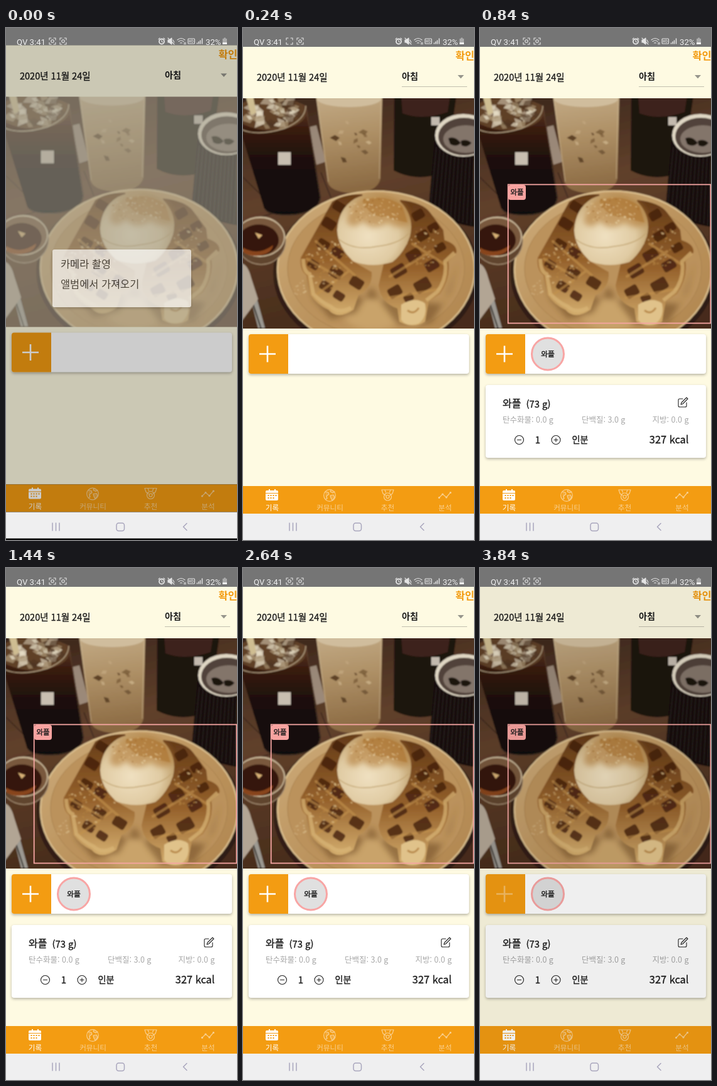
Write an HTML page that moves like this. It is 368 px wide and 816 px high and loops after 3.96 s.

```html
<!DOCTYPE html>
<html lang="ko">
<head>
<meta charset="utf-8">
<title>식단 기록</title>
<style>
html, body { margin: 0; width: 100%; height: 100%; overflow: hidden; background: #000; }
svg { display: block; width: 368px; height: 816px; }
text { font-family: 'Noto Sans CJK KR', 'Noto Sans', sans-serif; fill: #1c1c1c; }
.b { font-weight: 700; }
.m { stroke: #1c1c1c; stroke-width: .35px; }
.sys { font: 13.2px Roboto, sans-serif; fill: #eee; }
.line { fill: none; stroke: currentColor; stroke-linecap: round; stroke-linejoin: round; }
.info text { font-size: 12.5px; font-weight: 300; fill: #a6a6a6; }
.tabs text { font-size: 11.6px; text-anchor: middle; fill: #f9cf8e; }
.tabs { color: #f9cf8e; }
.card { filter: drop-shadow(0 2px 2px rgba(0,0,0,.28)); }
</style>
</head>
<body>
<svg viewBox="0 0 368 816">
  <defs>
    <linearGradient id="table" x1="0" y1="0" x2=".25" y2="1">
      <stop offset="0" stop-color="#38241a"/><stop offset=".45" stop-color="#60402b"/><stop offset="1" stop-color="#472c1b"/>
    </linearGradient>
    <linearGradient id="coffee" x1="0" y1="0" x2="0" y2="1">
      <stop offset="0" stop-color="#6d4a30"/><stop offset=".26" stop-color="#3a1c10"/><stop offset=".55" stop-color="#1b0f0b"/><stop offset="1" stop-color="#110b09"/>
    </linearGradient>
    <linearGradient id="latte" x1="0" y1="0" x2=".1" y2="1">
      <stop offset="0" stop-color="#c3ab86"/><stop offset=".45" stop-color="#ae9066"/><stop offset="1" stop-color="#8b6a43"/>
    </linearGradient>
    <linearGradient id="plate" x1="0" y1="0" x2="1" y2="1">
      <stop offset="0" stop-color="#cdac7b"/><stop offset=".5" stop-color="#bb935d"/><stop offset="1" stop-color="#b0854e"/>
    </linearGradient>
    <radialGradient id="cream" cx=".42" cy=".6" r=".62">
      <stop offset="0" stop-color="#efe0c0"/><stop offset=".65" stop-color="#e0cba3"/><stop offset="1" stop-color="#bd9c68"/>
    </radialGradient>
    <linearGradient id="waffle" x1="0" y1="0" x2="0" y2="1">
      <stop offset="0" stop-color="#643a18"/><stop offset=".55" stop-color="#96622c"/><stop offset="1" stop-color="#d3ad6e"/>
    </linearGradient>
    <clipPath id="frame"><rect y="112" width="368" height="367"/></clipPath>
    <clipPath id="sheet"><rect y="30" width="368" height="744"/></clipPath>
    <filter id="soft" x="-5%" y="-5%" width="110%" height="110%"><feGaussianBlur stdDeviation=".8"/></filter>
    <filter id="haze" x="-30%" y="-30%" width="160%" height="160%"><feGaussianBlur stdDeviation="5"/></filter>
  </defs>

  <g id="page">
    <rect y="-4" width="368" height="34" fill="#757575"/>
    <rect y="30" width="368" height="700" fill="#fefae2"/>
    <g clip-path="url(#sheet)">
      <text class="b" x="338.5" y="50" font-size="16.4" style="fill:#f39c12">확인</text>
      <text class="m" x="22" y="84.3" font-size="14.5">2020년 11월 24일</text>
      <text class="b" x="253" y="82.3" font-size="14.2">아침</text>
      <path d="M342 75h10l-5 5.5z" fill="#96958c"/>
      <path id="rule" d="M253 93.5h104" stroke="#c2bfae"/>

      <g id="photo" clip-path="url(#frame)"><g filter="url(#soft)">
        <rect x="-4" y="108" width="376" height="375" fill="url(#table)"/>
        <path d="M0 238L60 296M124 230L140 270M0 310L110 276" stroke="#33211a" stroke-width="2" opacity=".6"/>
        <path d="M105 158l12-3 15 58-15 5z" fill="#b3a595" opacity=".75"/>

        <path d="M241 108H340L334 150 300 236Q268 242 240 227Z" fill="#1f130e"/>
        <path d="M252 108h78l-4 26q-40 14-72 2z" fill="#3d241a"/>
        <rect x="300" y="142" width="13" height="13" fill="#c2b9ad"/>

        <path d="M116 108H222L219 240Q214 262 176 263 140 262 135 246Z" fill="url(#latte)"/>
        <ellipse cx="169" cy="113" rx="51" ry="13" fill="#d0bd9d"/>
        <g id="cubes"/>
        <path d="M118 112L136 245M220 112L217 240" stroke="#d4c1a0" fill="none" opacity=".6"/>

        <path d="M-8 128Q45 96 101 124L124 270Q122 292 84 298 40 301 34 288L-8 150Z" fill="url(#coffee)"/>
        <ellipse cx="44" cy="136" rx="56" ry="27" fill="#5f4028"/>
        <g id="ice"/>
        <path d="M4 108l9 31 8-4-5-27z" fill="#cfbd92"/>
        <path d="M-6 160Q20 174 66 160 100 146 100 124" fill="none" stroke="#b5a284" stroke-width="1.4"/>
        <path d="M101 130L123 270Q121 291 84 297 44 301 34 288" fill="none" stroke="#6b523f" opacity=".7"/>
        <rect x="56" y="198" width="20" height="20" fill="#c8beb0"/>

        <path d="M306 168L295 294Q325 310 368 317V150Z" fill="#17110f"/>
        <g id="ribs" stroke="#2a201a" stroke-width="1.5"/>
        <ellipse cx="351" cy="171" rx="45" ry="34" fill="#e0d7c4"/>
        <ellipse cx="352" cy="173" rx="41" ry="30" fill="#51433a"/>
        <ellipse cx="355" cy="177" rx="36" ry="22" fill="#83756a"/>
        <path d="M327 176q10-5 20 7 -7 8-17 2zM347 180q9-4 17 3 -7 9-16 4z" fill="#1d1511"/>

        <ellipse cx="212" cy="390" rx="164" ry="129" fill="#20130c" opacity=".6"/>
        <ellipse cx="212" cy="385" rx="157" ry="125" fill="url(#plate)" stroke="#dcc090" stroke-width="2.5"/>
        <ellipse cx="212" cy="383" rx="141" ry="108" fill="#bb925c" stroke="#a8814e"/>
        <ellipse cx="208" cy="455" rx="48" ry="26" fill="#c9a36b" filter="url(#haze)"/>
        <path d="M104 400L112 432 140 464 180 454 205 412 222 440 246 472 300 470 330 420 343 372 320 440 190 430z" fill="#6d4824" opacity=".55" filter="url(#haze)"/>

        <path d="M190 265Q160 264 142 277L119 318 92 366Q90 386 101 394L107 425Q118 441 136 449 151 466 176 449L184 426Q207 414 205 389L172 370 196 300Z" fill="url(#waffle)"/>
        <path d="M250 274Q286 278 298 294L319 322 321 338Q342 345 340 358L327 372Q331 398 314 424L296 436 290 468Q272 480 249 468L246 447Q219 438 216 410L224 376 262 344Z" fill="url(#waffle)"/>
        <g id="pockets" fill="#431f0c"/>
        <path d="M102 368l52 30M116 340l62 54M118 424l50-36M234 396l64-40M270 344l50 32M232 430l82-14" fill="none" stroke="#c4934f" stroke-width="4" stroke-linecap="round" opacity=".6"/>
        <path d="M96 368Q96 388 106 392L112 424Q126 438 140 444 152 456 172 446M337 358L322 372Q326 398 310 420L292 434" fill="none" stroke="#d9b677" stroke-width="6" opacity=".7"/>
        <path d="M252 441q22-14 38-2 4 21-10 32 -20 6-28-6z" fill="#e0c28a"/>
        <path d="M262 450q10 8 18-4" fill="none" stroke="#b98a4b" stroke-width="3"/>

        <path d="M150 322Q152 288 178 272 212 255 249 275 274 300 266 332 257 358 238 373 205 383 176 372 151 350 150 322Z" fill="url(#cream)"/>
        <path d="M165 309Q168 280 194 268 229 258 255 280 268 297 265 313 245 323 231 310 205 326 191 307 176 324 165 309Z" fill="#b17a38" opacity=".6" filter="url(#haze)"/>
        <path d="M190 276Q226 262 254 284L262 310Q240 306 226 300 204 304 190 276Z" fill="#ab7331" opacity=".55"/>
        <path d="M152 336Q176 356 214 348 250 344 264 327" fill="none" stroke="#c4a775" stroke-width="1.6"/>
        <g id="sugar"/>

        <ellipse cx="29" cy="339" rx="39" ry="38" fill="#61442f" stroke="#a18b70" stroke-width="1.4"/>
        <ellipse cx="27" cy="333" rx="39" ry="31" fill="#79593c" stroke="#cdbb9c" stroke-width="1.8"/>
        <ellipse cx="25" cy="338" rx="32" ry="25" fill="#34160a"/>
        <path d="M0 350q24 14 48-4 -2 14-24 17 -15 1-24-6z" fill="#88451a"/>
        <path d="M19 326l12 4-6 6z" fill="#d8b176"/>

        <path d="M12 430l9-3 14 51h-11z" fill="#9c9992"/>
        <path d="M16 440l13 40" stroke="#26201d" stroke-width="2"/>
        <path d="M-2 375Q8 378 13 398L24 432-2 467Z" fill="#b2a594"/>
      </g></g>

      <g class="found">
        <rect x="44.7" y="249.5" width="322.6" height="221" fill="none" stroke="#f6a5a2" stroke-width="1.8"/>
        <rect x="45" y="250" width="28" height="24" rx="4" fill="#f8a3a0"/>
        <text class="m" x="59" y="266.4" font-size="11.5" text-anchor="middle">와플</text>
      </g>

      <g class="card">
        <rect x="9" y="488" width="351" height="63" rx="4" fill="#fff"/>
        <path d="M72 488H13a4 4 0 0 0-4 4v55a4 4 0 0 0 4 4h59z" fill="#f39c12"/>
      </g>
      <path id="plus" d="M26 519.5h26M39 506.5v26" stroke="#fff" stroke-width="2.6"/>

      <g class="found">
        <circle cx="108" cy="519.5" r="25.5" fill="#e0e0e0" stroke="#f8a5a4" stroke-width="3"/>
        <text class="m" x="108" y="524" font-size="11.8" text-anchor="middle">와플</text>
        <rect class="card" x="9" y="569" width="351" height="116" rx="4" fill="#fff"/>
        <text class="m" x="36" y="604" font-size="16">와플</text>
        <text class="m" x="73.5" y="604.5" font-size="14.8">(73 g)</text>
        <g class="line" color="#222" stroke-width="1.1">
          <path d="M323 591h-5a2 2 0 0 0-2 2v9a2 2 0 0 0 2 2h9a2 2 0 0 0 2-2v-5M320 600l1-3 8-8 2 2-8 8z"/>
          <circle cx="62.5" cy="656.5" r="7"/><path d="M59.5 656.5h6"/>
          <circle cx="121" cy="656.5" r="7"/><path d="M118 656.5h6M121 653.5v6"/>
        </g>
        <g class="info">
          <text x="36" y="628.7">탄수화물: 0.0 g</text>
          <text x="162" y="628.7">단백질: 3.0 g</text>
          <text x="332.5" y="628.7" text-anchor="end">지방: 0.0 g</text>
        </g>
        <text class="m" x="92" y="661.5" font-size="15" text-anchor="middle">1</text>
        <text class="m" x="146.5" y="661.2" font-size="14.2">인분</text>
        <text class="m" x="332.5" y="661.5" font-size="16.4" text-anchor="end">327 kcal</text>
      </g>

      <rect y="730" width="368" height="44" fill="#f39c12"/>
      <g class="tabs">
        <g color="#fff">
          <path d="M38 737h3v-2h2v2h7v-2h2v2h2q2 0 2 2v12q0 2-2 2H38q-2 0-2-2v-12q0-2 2-2z" fill="#fff"/>
          <path d="M36 741.5h20" stroke="#f39c12"/>
          <path d="M39.5 745h14M39.5 749h10" stroke="#f39c12" stroke-width="2" stroke-dasharray="2 2"/>
          <text x="46.5" y="769.3" style="fill:#fff">기록</text>
        </g>
        <g class="line" stroke-width="1.2">
          <circle cx="138" cy="745" r="9.3"/>
          <path d="M131 739l5 1 1 3-4 3 1 4-2 1M140 736l-1 3 4 2 3-2M139 745l5-1 2 4-4 5-2-4z" fill="#f9cf8e" fill-opacity=".35"/>
          <path d="M221 736h19l-2 6-4 3M221 736l2 6 4 3M226 736l1.5 4M235 736l-1.5 4"/>
          <circle cx="230.5" cy="747" r="6"/><circle cx="230.5" cy="747" r="2.5"/>
          <path d="M313 748l5-5 6 5 6-7"/>
          <g fill="#f9cf8e"><circle cx="312.5" cy="748.5" r="1"/><circle cx="318" cy="743" r="1"/><circle cx="324" cy="748" r="1"/><circle cx="330.5" cy="740.5" r="1"/></g>
        </g>
        <text x="138.5" y="769.3">커뮤니티</text>
        <text x="230.5" y="769.3">추천</text>
        <text x="322" y="769.3">분석</text>
      </g>
      <rect id="dim" y="30" width="368" height="744"/>
    </g>
    <rect y="774" width="368" height="42" fill="#efeff0"/>
  </g>

  <g id="dialog">
    <rect class="card" x="74" y="353" width="221" height="92" rx="3" fill="#fff"/>
    <text x="87" y="381.7" font-size="16.4">카메라 촬영</text>
    <text x="87" y="414.2" font-size="16.4">앨범에서 가져오기</text>
  </g>

  <text class="sys" x="17" y="26.5">QV 3:41</text>
  <text class="sys" x="318" y="26.5">32%</text>
  <g class="line" color="#e4e4e4" stroke-width="1.1">
    <path d="M69 19v-3h3M76 16h3v3M79 23v3h-3M72 26h-3v-3M86 19v-3h3M93 16h3v3M96 23v3h-3M89 26h-3v-3"/>
    <circle id="lens" cx="74" cy="21" r="2.2"/><circle cx="91" cy="21" r="2.2"/>
    <circle cx="248" cy="21.5" r="4" stroke-width="1.8"/><path d="M248 19.5v2l1.5 1M243 18l2-2M253 18l-2-2"/>
    <path d="M258 19h2l4-3v10l-4-3h-2z" fill="#e4e4e4"/><path d="M258 16l10 10M266 19l2 4"/>
    <path d="M273 19q6-5 12 0M275 21.5q4-3 8 0M277.5 24q1.500-1 3 0M284 23v3M286 26v-3"/>
    <rect x="290" y="17" width="10.5" height="8" rx="1"/>
    <path d="M292 19v4M294 19v4M292 21h2M296 19v4q3 0 3-2t-3-2" stroke-width=".7"/>
    <path d="M304.5 25v-1M307 25v-3M309.5 25v-5M312.5 25v-8" stroke-width="1.5"/>
  </g>
  <path d="M345 17h2v-1.5h3V17h2v9h-7z" fill="#aaa"/><path d="M345 23h7v3h-7z" fill="#f0f0f0"/>
  <g class="line" color="#a9a6bd" stroke-width="1.5">
    <path d="M74 789v12M79.5 789v12M85 789v12M288 789.5l-5.5 5.5 5.5 5.5"/>
    <rect x="176" y="789" width="12.5" height="12.5" rx="3.5"/>
  </g>
</svg>
<script>
const $ = id => document.getElementById(id);
const found = document.querySelectorAll('.found');

let seed = 11;
const rnd = (a, b) => {
  seed = (seed * 16807) % 2147483647;
  return a + (b - a) * seed / 2147483647;
};

function add(parent, tag, attrs) {
  const el = document.createElementNS('http://www.w3.org/2000/svg', tag);
  for (const k in attrs) el.setAttribute(k, attrs[k]);
  $(parent).append(el);
}

// Scatters angular flecks inside an ellipse
function scatter(id, n, cx, cy, rx, ry, size, colors) {
  for (let i = 0; i < n; i++) {
    const a = rnd(0, 2 * Math.PI), r = Math.sqrt(rnd(0, 1));
    const s = rnd(size * .4, size);
    const x = cx + rx * r * Math.cos(a), y = cy + ry * r * Math.sin(a);
    add(id, 'path', {
      d: `M${-s} 0L0 ${-s * .6} ${s} ${-s * .1} ${s * .3} ${s * .6}Z`,
      transform: `translate(${x} ${y}) rotate(${rnd(-50, 50)})`,
      fill: colors[i % colors.length], opacity: rnd(.5, .9)
    });
  }
}

function pockets(list, angle) {
  for (const [x, y, s] of list) add('pockets', 'rect', {
    x: -s, y: -s * .75, width: 2 * s, height: 1.5 * s, rx: 4,
    transform: `translate(${x} ${y}) rotate(${angle})`, opacity: .8
  });
}

scatter('ice', 46, 47, 136, 46, 22, 13, ['#d9ceb6', '#a48e6e', '#e4dac3', '#4d3522']);
scatter('cubes', 12, 176, 180, 34, 34, 8, ['#54391f', '#755735', '#c9b088']);
scatter('sugar', 80, 210, 292, 44, 22, 2.6, ['#ead5aa', '#d9b67c', '#a26c2e']);
scatter('sugar', 55, 135, 375, 38, 40, 3.4, ['#dfc28c', '#b98846']);
scatter('sugar', 36, 290, 348, 26, 34, 3.2, ['#dfc28c', '#b98846']);
scatter('sugar', 16, 92, 414, 14, 12, 2.4, ['#d9bd8d']);
pockets([[153, 285, 10], [137, 312, 11], [128, 345, 10], [112, 377, 9], [150, 358, 10], [148, 390, 11], [181, 406, 11], [132, 412, 10], [153, 427, 9]], 32);
pockets([[279, 298, 10], [303, 318, 9], [286, 331, 10], [314, 350, 9], [272, 362, 12], [301, 378, 11], [248, 387, 12], [286, 410, 13], [242, 420, 11], [264, 430, 8]], -30);
for (let i = 0; i < 13; i++) {
  add('ribs', 'path', { d: `M${308 + i * 6} ${190 + i * 1.6}L${298 + i * 6.5} ${294 + i * 2}` });
}

const PERIOD = 3960;
// [start ms, shade, dialog, photo, plus, results]
const steps = [
  [0, .2, .66, .55, 1, 0],
  [120, 0, 0, .88, 1, 0],
  [240, 0, 0, 1, 1, 0],
  [840, 0, 0, 1, 1, 1],
  [3840, .062, 0, 1, .35, 1]
];

function draw(now) {
  const t = now % PERIOD;
  const [start, shade, dialog, photo, plus, done] = steps.findLast(s => s[0] <= t);
  const open = start === 0;
  $('dim').style.opacity = shade;
  $('dialog').style.opacity = dialog;
  $('photo').style.opacity = photo;
  $('plus').style.opacity = plus;
  $('rule').style.opacity = open ? 0 : 1;
  $('lens').style.opacity = open || done ? 1 : 0;
  for (const el of found) el.style.opacity = done;
  $('page').setAttribute('transform', `translate(0 ${open ? -2.5 : 0})`);
}

const origin = performance.now();
function tick() {
  draw(performance.now() - origin);
  requestAnimationFrame(tick);
}
tick();
</script>
</body>
</html>
```
